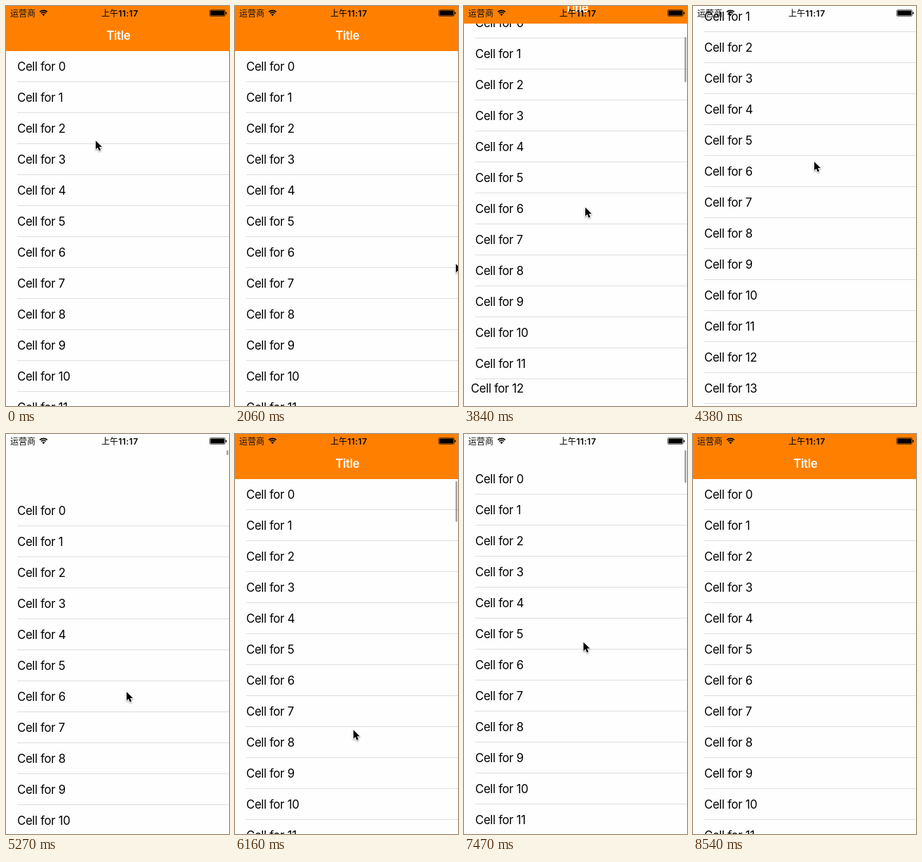
An HTML page with a canvas that plays this animation: 318 by 568 pixels, repeating every 8860 ms.

```html
<!DOCTYPE html>
<html lang="zh">
<head>
<meta charset="utf-8">
<title>Title</title>
<style>
html, body { margin: 0; width: 318px; height: 568px; overflow: hidden; background: #fefefe; }
canvas { display: block; width: 318px; height: 568px; }
</style>
</head>
<body>
<canvas id="stage"></canvas>
<script>
const W = 318, H = 568, LOOP = 8860, STEP = 88.8;
const ROW = 44, ROWS = 100, BAR = 64, STATUS = 20;
const LATIN = 'Inter, Roboto, sans-serif';
const HAN = '"Noto Sans CJK SC", "Noto Sans CJK", sans-serif';
const BODY = 16.8, TIGHT = -0.34;

const canvas = document.getElementById('stage');
const ctx = canvas.getContext('2d');
const ratio = window.devicePixelRatio || 1;
canvas.width = W * ratio;
canvas.height = H * ratio;

// A track starts at a value and eases to a new one in each move.
function track(value, ...moves) {
  return t => {
    let v = value;
    for (const { from, to, end } of moves) {
      const k = Math.min(1, Math.max(0, (t - from) / (to - from)));
      v += (end - v) * k * k * (3 - 2 * k);
    }
    return v;
  };
}
const move = (from, to, end) => ({ from, to, end });

// The pointer follows a path of points, one track for each axis.
function path(x, y, ...legs) {
  const axis = (v, i) => track(v, ...legs.map(l => move(l[0], l[1], l[i])));
  const px = axis(x, 2), py = axis(y, 3);
  return t => [px(t), py(t)];
}

const pullUp = 3718, pullUpAgain = 6330;
const listTop = track(BAR,
  move(3530, 4111, -51), move(5000, 5256, 86.5), move(5320, 5523, BAR),
  move(6145, 6855, -135), move(7100, 7500, 84), move(7560, 7743, BAR));
const barHidden = track(0,
  move(pullUp, pullUp + 205, 1), move(5270, 5500, 0),
  move(pullUpAgain, pullUpAgain + 205, 1), move(7480, 7710, 0));
const thumbAlpha = track(0,
  move(3565, 3575, 1), move(4200, 4365, 0), move(5060, 5075, 1),
  move(5400, 5520, 0), move(6125, 6140, 1), move(7640, 7815, 0));

const pointerIn = path(127, 190, [0, 266, 128, 245], [360, 444, 134, 247]);
const pointerMain = path(314, 365,
  [2060, 2682, 141, 160], [2682, 2948, 180, 89], [3040, 3392, 172, 335],
  [3530, 4200, 172, 220], [4400, 4813, 171, 148], [5000, 5256, 171, 365],
  [5700, 5967, 168, 428], [6056, 6855, 166, 172], [7090, 7743, 174, 454],
  [8098, 8560, 262, 590]);

function hold(t) {
  const base = t < 2055 ? 0 : 2060;
  return base + Math.floor((t - base + 5) / STEP) * STEP;
}

function text(str, x, y, font, color, spacing = 0, align = 'left') {
  ctx.font = font;
  ctx.letterSpacing = spacing + 'px';
  ctx.textAlign = align;
  ctx.fillStyle = color;
  ctx.fillText(str, x, y);
}

function pill(x, y, w, h, r, color) {
  ctx.beginPath();
  ctx.roundRect(x, y, w, h, r);
  ctx.fillStyle = color;
  ctx.fill();
}

function drawList(top, slide) {
  const fresh = Math.floor(H / ROW);
  for (let i = 0; i < ROWS; i++) {
    const y = top + i * ROW;
    if (y > H || y + ROW < 0) continue;
    // The row that appears while the bar slides away slides in its label.
    const k = i === fresh ? slide : 1;
    text('Cell for ' + i, 16 * k, y + 22 * k + 6, BODY + 'px ' + LATIN, '#000', TIGHT);
    ctx.fillStyle = '#dededf';
    ctx.fillRect(16, Math.round(y + ROW - 1), W - 16, 1);
  }
}

function drawThumb(top, hidden, alpha) {
  if (alpha <= 0) return;
  const inset = BAR - (BAR - STATUS) * hidden;
  const view = H - inset, total = ROWS * ROW;
  const size = Math.max(7, view * view / total - Math.max(0, top - inset));
  const y = inset + 3 + Math.max(0, inset - top) / total * view;
  pill(314.5, y, 2.5, size, 1.25, `rgba(0,0,0,${0.36 * alpha})`);
}

function drawBar(hidden) {
  if (hidden >= 1) return;
  const y = Math.round(-BAR * hidden);
  ctx.fillStyle = '#ff8000';
  ctx.fillRect(0, y, W, BAR);
  text('Title', 160.3, y + 48, `600 ${BODY}px ${LATIN}`, '#fff', TIGHT, 'center');
}

function drawStatus() {
  text('运营商', 6, 14.5, '12px ' + HAN, '#111');
  text('上午', 136, 14.5, '500 12px ' + HAN, '#000');
  text('11:17', 160.3, 14.5, '600 12px ' + LATIN, '#000', 0.45);

  ctx.strokeStyle = ctx.fillStyle = '#000';
  ctx.lineWidth = 1.7;
  const a = -Math.PI / 2, spread = 0.76;
  for (const r of [4.9, 7.7]) {
    ctx.beginPath();
    ctx.arc(53.5, 14, r, a - spread, a + spread);
    ctx.stroke();
  }
  ctx.beginPath();
  ctx.moveTo(53.5, 14.2);
  ctx.arc(53.5, 14, 2.8, a - spread, a + spread);
  ctx.fill();

  ctx.lineWidth = 1;
  ctx.strokeStyle = 'rgba(0,0,0,.6)';
  ctx.beginPath();
  ctx.roundRect(290.5, 5.5, 22, 9, 1.6);
  ctx.stroke();
  pill(291.5, 6.5, 20, 7, 0.6, '#000');
  pill(313.3, 8.5, 1.4, 3.2, 0.7, '#000');
}

const arrow = new Path2D('M.5 .5V14.6L3.7 11.6L6 16.9L8.6 15.8L6.3 10.6H10.8Z');

function drawPointer([x, y]) {
  ctx.save();
  ctx.translate(x + 0.5, y + 0.7);
  ctx.scale(0.88, 0.88);
  ctx.shadowColor = 'rgba(0,0,0,.4)';
  ctx.shadowBlur = 2 * ratio;
  ctx.shadowOffsetY = ratio;
  ctx.lineWidth = 2;
  ctx.lineJoin = 'round';
  ctx.strokeStyle = '#fff';
  ctx.stroke(arrow);
  ctx.shadowColor = 'transparent';
  ctx.fillStyle = '#000';
  ctx.fill(arrow);
  ctx.restore();
}

function draw(t) {
  const top = listTop(t), hidden = barHidden(t);
  const hiding = hidden > barHidden(t - 20);
  ctx.setTransform(ratio, 0, 0, ratio, 0, 0);
  ctx.fillStyle = '#fefefe';
  ctx.fillRect(0, 0, W, H);
  drawList(top, hiding ? hidden : 1);
  drawThumb(top, hidden, thumbAlpha(t));
  drawBar(hidden);
  drawStatus();
  if (t < 525) drawPointer(pointerIn(t));
  else if (t >= 2055 && t < 8530) drawPointer(pointerMain(t));
}

const start = performance.now();
function tick() {
  draw(hold((performance.now() - start) % LOOP));
  requestAnimationFrame(tick);
}
tick();
</script>
</body>
</html>
```
